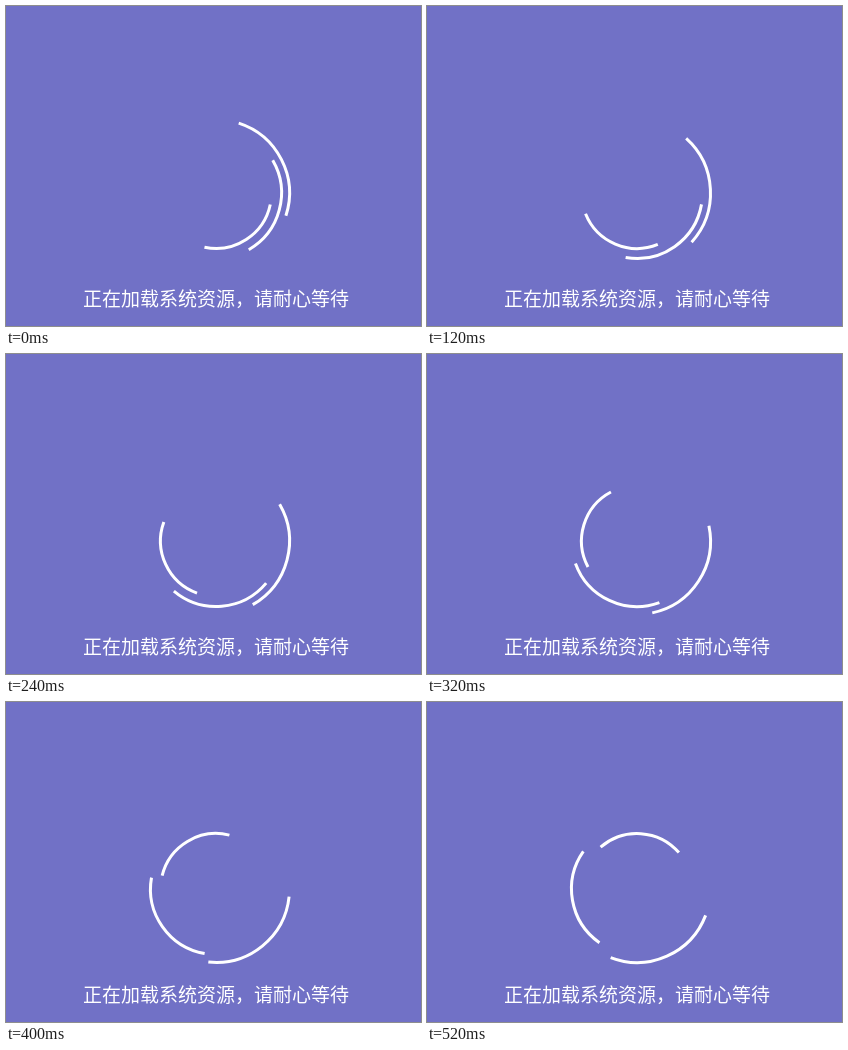
These frames come from a looping animation (415 by 320 pixels, 0.81 s). An HTML page with a canvas:

```html
<!DOCTYPE html>
<html lang="zh-CN">
<head>
<meta charset="utf-8">
<title>Loading</title>
<style>
  html, body { margin: 0; width: 100%; height: 100%; overflow: hidden; background: #7171c6; }
  canvas { position: absolute; left: 0; top: 0; display: block; }
  p {
    position: absolute; left: 10px; top: 277px; width: 400px; margin: 0;
    color: #fff; text-align: center; white-space: nowrap;
    font: 19px/30px "Noto Sans CJK SC", "Noto Sans CJK", sans-serif;
  }
</style>
</head>
<body>
<canvas id="stage" width="415" height="320"></canvas>
<p>正在加载系统资源，请耐心等待</p>
<script>
const ctx = document.getElementById('stage').getContext('2d');
const LOOP = 810;
const CENTER = { x: 210, y: 187 };
const START_TICK = 21;

// Each ring turns a fixed number of degrees per 1/60 s tick.
const rings = [
  { radius: 73.5, speed: 3 },
  { radius: 65.5, speed: 5 },
  { radius: 55.5, speed: 7 }
];

// The spinner advances in hard steps: [time in ms, elapsed ticks].
const steps = [
  [0, 0], [40, 3], [80, 6], [120, 8], [160, 11], [240, 14],
  [280, 17], [320, 20], [360, 23], [400, 26], [480, 29], [520, 31]
];

const radians = degrees => degrees * Math.PI / 180;

function ticksAt(time) {
  return steps.filter(([start]) => start <= time).pop()[1];
}

function drawRing({ radius, speed }, tick) {
  const middle = speed * tick - 90;
  ctx.beginPath();
  ctx.arc(CENTER.x, CENTER.y, radius, radians(middle - 45), radians(middle + 45));
  ctx.stroke();
}

function draw(time) {
  const tick = START_TICK + ticksAt(time);
  ctx.clearRect(0, 0, 415, 320);
  ctx.strokeStyle = '#fff';
  ctx.lineWidth = 3;
  rings.forEach(ring => drawRing(ring, tick));
}

let origin;
function frame(now) {
  origin ??= now;
  draw(Math.max(0, now - origin) % LOOP);
  requestAnimationFrame(frame);
}

draw(0);
requestAnimationFrame(frame);
</script>
</body>
</html>
```
